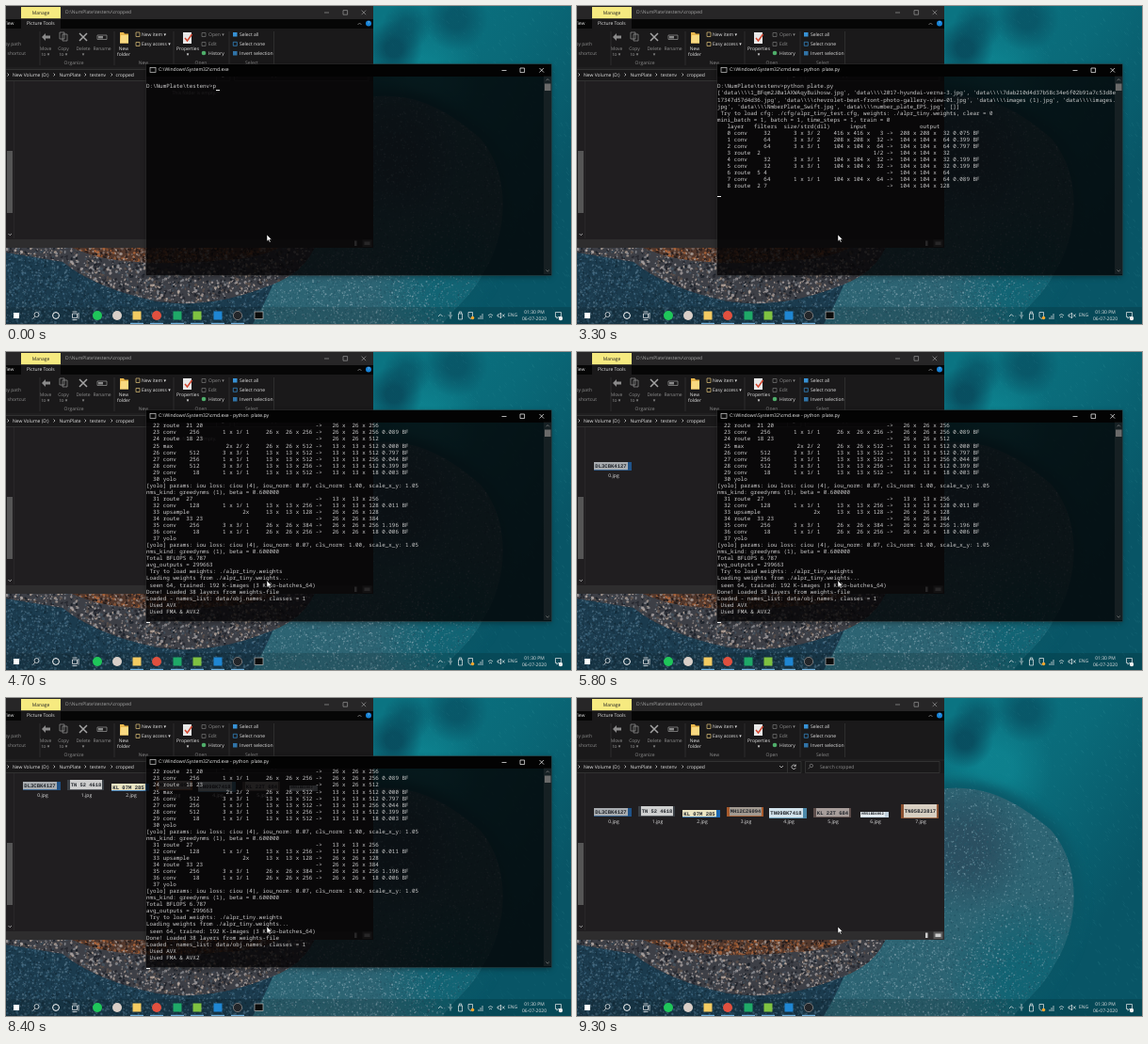
Write an HTML page with a canvas that moves like this. It is 600 by 338 pixels and loops after 9400 ms.

```html
<!DOCTYPE html>
<html lang="en">
<head>
<meta charset="utf-8">
<title>Plate detection run</title>
<style>
  html, body { margin: 0; width: 600px; height: 338px; overflow: hidden; background: #0a6070; }
  canvas, svg, #term { position: absolute; left: 0; top: 0; }
  svg, #term { text-rendering: geometricPrecision; font-family: "Open Sans", "Noto Sans", sans-serif; }
  svg text { font-size: 5px; fill: #e4e4e4; dominant-baseline: central; transform: translateY(.8px); }
  svg .mid { text-anchor: middle; }
  svg .dim { fill: #8d8d8d; }
  svg .line { fill: none; stroke: #ddd; stroke-width: .7; }
  svg .plate { font: bold 5.2px "Liberation Mono", monospace; fill: #20242a; text-anchor: middle; transform: none; }

  #term { left: 149px; top: 61.5px; width: 430px; height: 223.5px;
    background: rgba(6,4,5,.83); box-shadow: 0 0 0 .5px #2c2c2c, 0 2px 6px rgba(0,0,0,.35);
    animation: close 9400ms linear infinite; }
  #bar { position: absolute; inset: 0 0 auto; height: 12.5px; background: #030303; }
  #title { position: absolute; left: 13px; top: 0; font-size: 5.1px; line-height: 12.5px; color: #eee; white-space: pre; }
  #out { position: absolute; left: 0; top: 13.4px; margin: 0; color: #ccc;
    font: 5.88px/7.04px "Noto Sans Mono", "Liberation Mono", monospace; }
  #cursor { border-bottom: 1px solid #eee; }
  #thumbs { animation: shift 9400ms step-end infinite; }
  #empty { animation: empty 9400ms step-end infinite; }
  #task { animation: gone 9400ms step-end infinite; }

  @keyframes shift { 0% { transform: none; } 84.04% { transform: translateY(-28px); } 93.62%, 100% { transform: none; } }
  @keyframes empty { 0% { opacity: 1; } 58.51%, 100% { opacity: 0; } }
  @keyframes gone { 0% { opacity: 1; } 95.2%, 100% { opacity: 0; } }
  @keyframes close {
    0%, 93.62% { opacity: 1; transform: none; }
    95.2%, 100% { opacity: 0; transform: scale(.94); }
  }
</style>
</head>
<body>
<canvas id="sea" width="600" height="338"></canvas>

<svg width="600" height="338" viewBox="0 0 600 338">
  <!-- file window -->
  <rect width="390" height="257" fill="#201e20"/>
  <rect width="390" height="14" fill="#272627"/>
  <rect y="14" width="390" height="10" fill="#060606"/>
  <rect x="16" y="1" width="42" height="12.5" fill="#f6ea80"/>
  <rect x="16" y="13.5" width="42" height="10.5" fill="#1a191a"/>
  <rect y="24" width="390" height="56" fill="#1a191a"/>
  <rect y="248" width="390" height="9" fill="#2e2d2e"/>
  <path d="M0 66H390M8.5 80V247" stroke="#2f2e2f" stroke-width=".6"/>
  <text x="37" y="7" class="mid" style="fill:#222">Manage</text>
  <text x="63" y="6.500" style="fill:#a5a5a5">D:\NumPlate\testenv\cropped</text>
  <path class="line" style="stroke:#999" d="M338 7h5M358 4.6h4.6v4.6h-4.6zM377.6 4.6l4.6 4.6m0-4.6l-4.6 4.6M373.5 20l2-2 2 2"/>
  <circle cx="385" cy="18.5" r="3" fill="#1683d8"/>
  <text x="385" y="17.8" class="mid" style="font-size:4px">?</text>
  <text x="-2.500" y="18.5">View</text><text x="22" y="18.5">Picture Tools</text>

  <g id="ribbon"></g>
  <path d="M36 27V63M115 27V63M178 27V63M237 27V63M284.500 27V63" stroke="#3c3c3c" stroke-width=".6"/>
  <path d="M38 33l4-4v2.500h5v3h-5v2.500z" fill="#8a8a8a"/>
  <path class="line" d="M57 28h5v7h-5zM60 30h5v7h-5z" style="stroke:#999"/>
  <path d="M78 29l8 8m0-8l-8 8" stroke="#a4a4a4" stroke-width="1.500"/>
  <path class="line" d="M97 31h10v4.500h-10z" style="stroke:#999"/><path d="M98 32h5v2.500h-5z" fill="#888"/>
  <path d="M121 28h4l1 1.500h4v10h-9z" fill="#e8b64c"/><path d="M122 31h8v8.500h-9z" fill="#f9d981"/>
  <path class="line" d="M138 28h4v4.500h-4zM138 38.500h4v4h-4z" style="stroke:#e3c47b"/>
  <path d="M188 28h9v12h-9z" fill="#e8e8e8"/><path d="M190 34l2.500 3 5-7" fill="none" stroke="#d2452f" stroke-width="1.500"/>
  <path class="line" d="M208 28.500h4v4h-4zM208 38.500h4v4h-4z" style="stroke:#777"/>
  <circle cx="210" cy="50" r="2.300" fill="#4fae6a"/>
  <g fill="#3792d6"><path d="M241 28h4.500v4.500H241z"/><path d="M241 48h4.500v4.500H241z" opacity=".75"/></g>
  <path class="line" d="M241.300 38.300h4v4h-4z" style="stroke:#3792d6"/>

  <path class="line" d="M-1 67.500H238V79.500H-1M242.500 67.500H385V79.500H242.500zM223.500 67.500v12" style="stroke:#3c3b3c"/>
  <text x="7" y="73">New Volume (D:)</text><text x="56.500" y="73">NumPlate</text>
  <text x="89" y="73">testenv</text><text x="116.500" y="73">cropped</text>
  <path class="line" d="M1.500 71.500l1.500 1.500-1.500 1.500M50.500 71.500l1.500 1.500-1.500 1.500M83.500 71.500l1.500 1.500-1.500 1.500M111.500 71.500l1.500 1.500-1.500 1.500M215 72l2 2 2-2M232 72a2.200 2.200 0 1 0 .3 2M232.300 70.500v2h-2"/>
  <path class="line" d="M250.500 72a1.700 1.700 0 1 0-3.400 0 1.700 1.700 0 0 0 3.400 0M247.300 73.500l-1.800 1.800" style="stroke:#888"/>
  <text x="258" y="73" class="dim">Search cropped</text>

  <rect x="1" y="154" width="6" height="66" fill="#555"/>
  <path class="line" d="M2.500 242l1.700 1.700 1.700-1.700"/>
  <rect x="378.500" y="248.500" width="10" height="7.500" fill="#5a5a5a"/>
  <path d="M370 249.500h2.500v5.500H370zM380.500 250.500h6v3.500h-6z" fill="#ccc"/>
  <text id="empty" x="200" y="92.500" class="mid dim">This folder is empty.</text>
  <g id="thumbs"></g>

  <!-- taskbar -->
  <rect y="320" width="600" height="18" fill="#04080b" opacity=".15"/>
  <path d="M8 326h6v6H8z" fill="#fff"/>
  <g class="line" style="stroke:#fff">
    <circle cx="32.500" cy="328" r="2.500"/><path d="M30.700 330l-2.300 2.500"/>
    <circle cx="53" cy="329" r="3.400" stroke-width="1"/>
    <path d="M70.500 327h5v4.500h-5zM77 326v6.500M70.500 325h5M70.500 333.500h5"/>
  </g>
  <g id="apps"></g>
  <rect id="task" x="264" y="325" width="9" height="7.500" fill="#0b0b0b" stroke="#bbb" stroke-width=".7"/>
  <g class="line" style="stroke:#eee">
    <path d="M459 330l2.300-2.300 2.300 2.300M472 325v4M470.300 328.500q1.700 3.500 3.400 0M472 330.500v2M480.500 327h4v6h-4zM481.300 327v-2h2.400v2"/>
    <path d="M491 325.500h4.500v5l-2.200 2-2.300-2zM502 333v-2M504 333v-4M506 333v-6M512 329q2.500-3 5 0M513 331q1.500-2 3 0M522 328h1.500l2-2v6l-2-2H522zM527 327.500l2.500 3m0-3l-2.500 3"/>
    <path d="M583.500 325.500h6v5h-3l-1.500 1.700v-1.700h-1.500z"/>
  </g>
  <circle cx="495.500" cy="331.500" r="1.800" fill="#f0a52c"/>
  <circle cx="589" cy="332" r="2.200" fill="#eee"/>
  <text x="538" y="328.500" class="mid">ENG</text>
  <text x="561" y="325" class="mid">01:30 PM</text><text x="561" y="332.300" class="mid">06-07-2020</text>
</svg>

<div id="term">
  <div id="bar"><span id="title"></span></div>
  <svg width="430" height="223">
    <rect x="4" y="3.500" width="6" height="5" fill="#0b0b0b" stroke="#ccc" stroke-width=".7"/>
    <path class="line" style="stroke:#fff" d="M377.500 6.500h5M397 4h4.600v4.600H397zM417.500 4l4.600 4.600m0-4.600l-4.600 4.600"/>
    <path d="M422 12.500h8V223h-8z" fill="#555" opacity=".22"/>
    <path d="M423 20.500h6.500v7.500h-6.500z" fill="#6a6a6a"/>
    <path class="line" style="stroke:#888" d="M424.500 17.300l1.700-1.700 1.700 1.700M424.500 218.500l1.700 1.700 1.700-1.700"/>
  </svg>
  <pre id="out"><span id="text"></span><span id="cursor"> </span></pre>
</div>

<svg width="600" height="338"><path d="M277 243v7.200l1.700-1.500 1.200 2.600 1.200-.6-1.200-2.500h2.300z" fill="#fff" stroke="#000" stroke-width=".5"/></svg>

<script>
const $ = id => document.getElementById(id);
const LOOP = 9400;

// ---- wallpaper ----
function paintSea() {
  const g = $('sea').getContext('2d');
  let seed = 7;
  const rnd = () => {
    seed = (seed + 0x6d2b79f5) | 0;
    let v = Math.imul(seed ^ seed >>> 15, 1 | seed);
    v = v + Math.imul(v ^ v >>> 7, 61 | v) ^ v;
    return ((v ^ v >>> 14) >>> 0) / 4294967296;
  };

  const blend = g.createLinearGradient(390, 40, 600, 170);
  blend.addColorStop(0, '#0b7482');
  blend.addColorStop(.5, '#0a6a79');
  blend.addColorStop(1, '#085566');
  g.fillStyle = blend;
  g.fillRect(0, 0, 600, 338);

  // soft round patch
  function glow(x, y, r, color, alpha) {
    const fade = g.createRadialGradient(x, y, r * .3, x, y, r);
    fade.addColorStop(0, color);
    fade.addColorStop(1, color + '00');
    g.globalAlpha = alpha;
    g.fillStyle = fade;
    g.fillRect(x - r, y - r, 2 * r, 2 * r);
    g.globalAlpha = 1;
  }
  function specks(n, [x, y, w, h], size, colors, alpha) {
    g.globalAlpha = alpha;
    for (let i = 0; i < n; i++) {
      g.fillStyle = colors[rnd() * colors.length | 0];
      const r = size * (.35 + rnd() * .65);
      g.beginPath();
      g.ellipse(x + rnd() * w, y + rnd() * h, r, r * (.5 + rnd() * .5), rnd() * 3, 0, 7);
      g.fill();
    }
    g.globalAlpha = 1;
  }
  function area(d, paint) {
    g.save();
    g.clip(new Path2D(d));
    paint();
    g.restore();
  }
  const fill = color => { g.fillStyle = color; g.fillRect(0, 0, 600, 338); };

  glow(445, 74, 60, '#0f8c98', .6);
  glow(412, 45, 30, '#084a5c', .9);
  glow(425, 22, 26, '#084e60', .6);
  glow(478, 14, 34, '#084e60', .7);

  const reef = 'M385 97C435 90 470 112 503 140C538 180 533 245 506 285C495 308 474 322 464 338H0V250H385Z';
  g.lineWidth = 16;
  g.strokeStyle = '#0a5666';
  g.filter = 'blur(6px)';
  g.stroke(new Path2D(reef));
  g.filter = 'none';

  // ripples
  g.strokeStyle = '#6cc0c4';
  g.lineWidth = .6;
  for (let i = 0; i < 1100; i++) {
    const x = 385 + rnd() * 215, y = rnd() * 338;
    g.globalAlpha = (.05 + rnd() * .15) * (x - 300) / 300;
    g.beginPath();
    g.moveTo(x, y);
    g.lineTo(x + 1 + rnd() * 2, y + 1 + rnd() * 3);
    g.stroke();
  }
  g.globalAlpha = 1;

  area(reef, () => {
    fill('#2d6473');
    glow(412, 160, 70, '#2a4a5c', .8);
    glow(480, 300, 90, '#0b6474', .8);
    specks(16000, [150, 90, 390, 248], 1, ['#1c4c5c', '#5b8a98', '#82a8b4', '#215a6a', '#356c7c'], .55);
    specks(1500, [150, 255, 300, 83], 1.1, ['#9fb8c4', '#6f92a2', '#274e60'], .55);
  });
  area('M0 250H300Q285 300 262 338H0Z', () => {
    fill('#1b3b4e');
    specks(5000, [0, 255, 300, 83], 1.4, ['#122836', '#2c5468', '#47708a', '#16303f', '#5a7c90'], .6);
  });
  area('M0 250H330Q320 285 272 300Q215 322 160 314Q95 300 60 272L0 262Z', () => {
    fill('#3d3f46');
    specks(3200, [0, 250, 330, 75], 1.8, ['#8b8c92', '#23252c', '#a8a0a0', '#5e524c', '#171d26', '#b7a79c', '#44525e'], .8);
  });
  area('M50 250H300Q280 268 230 270Q150 278 95 266Z', () => {
    fill('#53382c');
    specks(1300, [50, 252, 250, 26], 1.8, ['#8f532f', '#2a1f1d', '#b5683a', '#7d6a62', '#191719', '#a89a94'], .8);
  });
}

// ---- file window and taskbar ----
const label = (x, y, s, cls = '') => `<text x="${x}" y="${y}" class="${cls}">${s}</text>`;
const box = (x, y, w, h, fill) => `<rect x="${x}" y="${y}" width="${w}" height="${h}" fill="${fill}"/>`;

$('ribbon').innerHTML =
  [[144, 30, 'New item ▾'], [144, 40.5, 'Easy access ▾'], [215, 50, 'History'],
   [248, 30, 'Select all'], [248, 40.5, 'Select none'], [248, 50, 'Invert selection']]
    .map(a => label(...a)).join('') +
  [[-1.5, 30, 't'], [-1.5, 40.5, 'py path'], [-9.5, 50, 'aste shortcut'], [215, 30, 'Open ▾'], [215, 40.5, 'Edit']]
    .map(a => label(...a, 'dim')).join('') +
  [[125, 45, 'New'], [125, 51, 'folder'], [193, 45, 'Properties'], [193, 51, '▾']]
    .map(a => label(...a, 'mid')).join('') +
  [[42, 45, 'Move'], [42, 51, 'to ▾'], [61, 45, 'Copy'], [61, 51, 'to ▾'], [82, 45, 'Delete'], [82, 51, '▾'],
   [102, 45, 'Rename'], [72, 60, 'Organize'], [146, 60, 'New'], [207, 60, 'Open'], [261, 60, 'Select']]
    .map(a => label(...a, 'mid dim')).join('');

// x, y, width, height, plate colour, edge colour, number
const plates = [
  [18, 117, 40, 9, '#a9adb1', '#1f5288', 'DL3CBK4127'],
  [65, 115, 39, 11, '#cfd0d0', '#3a3f45', 'TN 52 4618'],
  [112, 119, 40, 8, '#ece6c4', '#1b68b4', 'KL 07M 285'],
  [159, 116, 39, 10, '#a39b92', '#a75a2c', 'MH12CZ6094'],
  [204, 117, 40, 11, '#d3e3ec', '#4c88a8', 'TN09BK7418'],
  [251, 117, 40, 10, '#a89e9b', '#5b4c4a', 'KL 22T 684'],
  [301, 121, 30, 6, '#e6edf2', '#c0d0dc', 'HR51BD4062'],
  [344, 113, 40, 15, '#d8cfc2', '#8b5030', 'TN05BJ3817']
];
$('thumbs').innerHTML = plates.map(([x, y, w, h, fill, edge, id], i) => {
  const tail = i % 2 ? 2 : 4, lead = i % 2 ? 3 : 0, size = w / 10 / .62 - .9;
  return '<g>' + box(x, y, w, h, edge) + box(x + lead, y, w - lead - tail, h - .8, fill) +
    `<text class="plate" style="font-size:${size}px" x="${x + (w + lead - tail) / 2}" y="${y + h / 2}">${id}</text>` +
    label(x + w / 2 + 1, 131.5, i + '.jpg', 'mid') + '</g>';
}).join('');

const dot = (x, fill, r = 5) => `<circle cx="${x}" cy="329" r="${r}" fill="${fill}"/>`;
const square = (x, fill) => box(x - 4.5, 324.5, 9, 9, fill);
$('apps').innerHTML = dot(97, '#1fc65a') + dot(118, '#d9cfc8') + square(139, '#f3cb62') + dot(160, '#e0503f') +
  square(182, '#1fa968') + square(203, '#7fc241') + square(225, '#1f86d2') + dot(246, '#23262a') +
  '<circle cx="246" cy="329" r="4.6" fill="none" stroke="#aaa" stroke-width=".6"/>' +
  [139, 160, 182, 203, 225, 246].map(x => box(x - 7, 336.8, 14, 1.2, '#6fb0dc')).join('');

// ---- terminal text ----
function netRows() {
  const rows = [];
  let n = 0;
  const pad = (v, w) => String(v).padStart(w);
  const dims = (w, c) => `${pad(w, 4)} x${pad(w, 4)} x${pad(c, 4)}`;
  const add = s => rows.push(pad(n++, 4) + ' ' + s);
  const flow = (w, c, W, C, ops) => `   ${dims(w, c)} -> ${dims(W, C)} ${(ops / 1e9).toFixed(3)} BF`;
  const conv = (f, k, s, w, c) => add(`conv  ${pad(f, 5)}       ${k} x ${k}/ ${s}` +
    flow(w, c, w / s, f, 2 * f * k * k * c * (w / s) ** 2));
  const max = (w, c) => add('max'.padEnd(18) + ' 2x 2/ 2' + flow(w, c, w / 2, c, w * w * c));
  const route = (from, w, c, part = '') =>
    add(('route  ' + from).padEnd(42) + pad(part, 3) + ' -> ' + dims(w, c));
  const yolo = () => {
    add('yolo');
    rows.push('[yolo] params: iou loss: ciou (4), iou_norm: 0.07, cls_norm: 1.00, scale_x_y: 1.05',
      'nms_kind: greedynms (1), beta = 0.600000');
  };

  conv(32, 3, 2, 416, 3);
  conv(64, 3, 2, 208, 32);
  for (const [w, c] of [[104, 64], [52, 128], [26, 256]]) {
    const b = n, h = c / 2;
    conv(c, 3, 1, w, c);
    route(b, w, h, '1/2');
    conv(h, 3, 1, w, h);
    conv(h, 3, 1, w, h);
    route(`${b + 3} ${b + 2}`, w, c);
    conv(c, 1, 1, w, c);
    route(`${b} ${b + 5}`, w, c * 2);
    max(w, c * 2);
  }
  conv(512, 3, 1, 13, 512);
  conv(256, 1, 1, 13, 512);
  conv(512, 3, 1, 13, 256);
  conv(18, 1, 1, 13, 512);
  yolo();
  route(27, 13, 256);
  conv(128, 1, 1, 13, 256);
  add('upsample'.padEnd(24) + '2x   ' + dims(13, 128) + ' -> ' + dims(26, 128));
  route('33 23', 26, 384);
  conv(256, 3, 1, 26, 384);
  conv(18, 1, 1, 26, 256);
  yolo();
  return rows;
}

const prompt = 'D:\\NumPlate\\testenv>', command = 'python plate.py';
const files = ['1_BFqm2J0a1AXWAqyBuihosw', '2017-hyundai-verna-3', '7dab210d4d37b58c34e6f02b91a7c53d8e17347d57d4d36',
  'chevrolet-beat-front-photo-gallery-view-01', 'images (1)', 'images', 'NmberPlate_Swift', 'number_plate_EPS'];
const list = '[' + files.map(f => `'data\\\\\\\\${f}.jpg'`).join(', ') + ', []]';
const rows = ['', prompt + command, ...list.match(/.{1,120}/g),
  ' Try to load cfg: ./cfg/alpr_tiny_test.cfg, weights: ./alpr_tiny.weights, clear = 0',
  'mini_batch = 1, batch = 1, time_steps = 1, train = 0',
  '   layer   filters  size/strd(dil)      input                output',
  ...netRows(),
  'Total BFLOPS 6.787',
  'avg_outputs = 299663',
  ' Try to load weights: ./alpr_tiny.weights',
  'Loading weights from ./alpr_tiny.weights...',
  ' seen 64, trained: 192 K-images (3 Kilo-batches_64)',
  'Done! Loaded 38 layers from weights-file',
  'Loaded - names_list: data/obj.names, classes = 1',
  ' Used AVX',
  ' Used FMA & AVX2'];

function screen(t) {
  if (t < 2600) return '\n' + prompt + command.slice(0, 1 + Math.floor(t / 175));
  const count = t < 2900 ? 2 : Math.min(rows.length, Math.max(5, 17 + Math.floor((t - 3300) / 26)));
  return [...rows.slice(0, count), ''].slice(-30).join('\n');
}
const cursorLit = t => t < 4170 || Math.floor((t - 4170) / 530) % 2 === 1;

// ---- playback ----
const thumbs = [...$('thumbs').children];
let start, shown;
function frame(now) {
  start ??= now;
  const t = (now - start) % LOOP;
  const text = screen(t);
  if (text !== shown) $('text').textContent = shown = text;
  $('cursor').style.visibility = cursorLit(t) ? 'inherit' : 'hidden';
  $('title').textContent = 'C:\\Windows\\System32\\cmd.exe' + (t < 2600 ? '' : ' - python  plate.py');
  thumbs.forEach((g, i) => g.style.visibility = t >= 5500 + i * 470 ? 'inherit' : 'hidden');
  requestAnimationFrame(frame);
}
paintSea();
requestAnimationFrame(frame);
</script>
</body>
</html>
```
